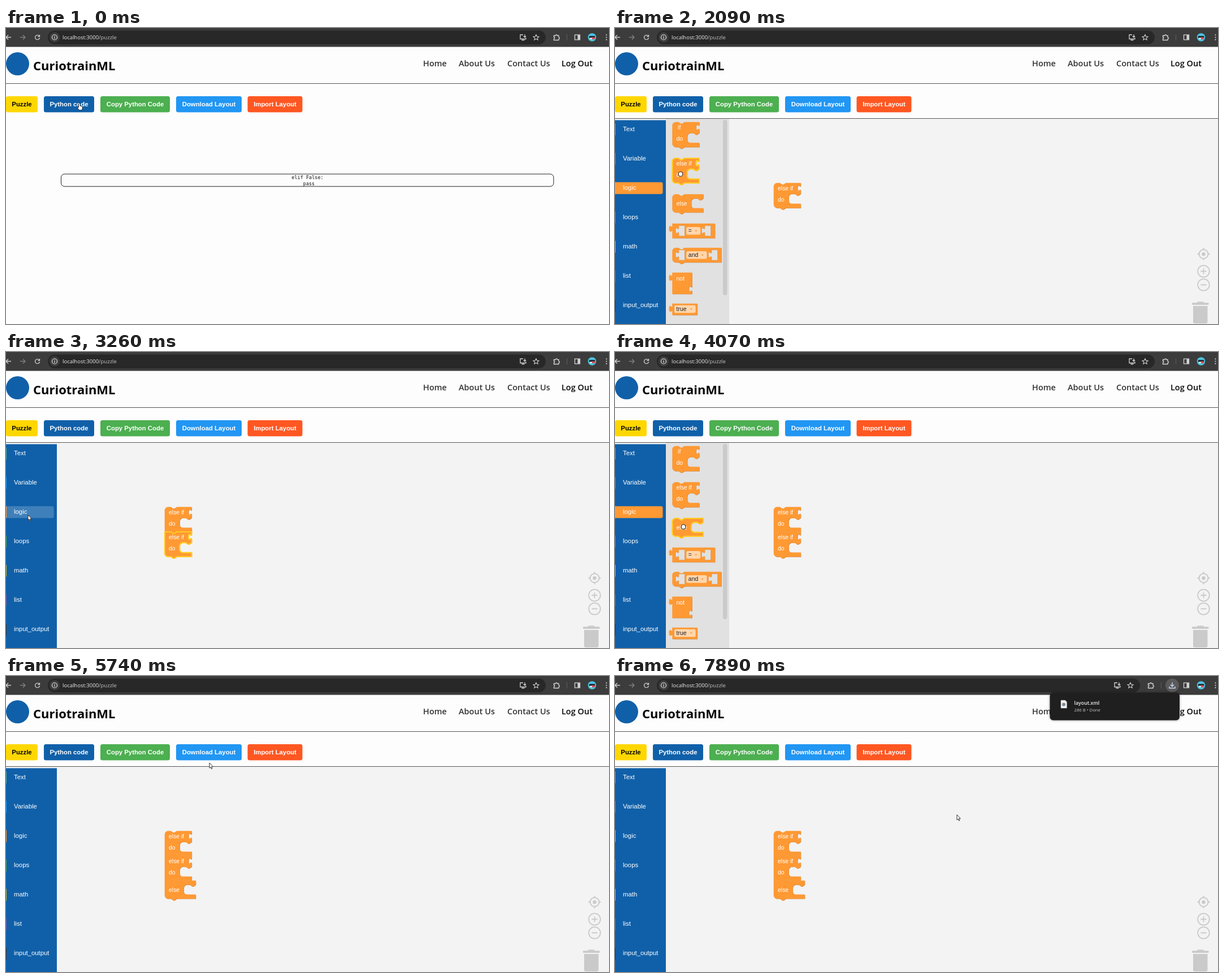
These frames come from a looping animation (1067 by 525 pixels, 8000 ms). An HTML page with a canvas:

```html
<!DOCTYPE html>
<html lang="en">
<head>
<meta charset="utf-8">
<title>Puzzle editor</title>
<style>
html, body { margin: 0; width: 100%; height: 100%; overflow: hidden; background: #fdfdfd; }
canvas { display: block; }
</style>
</head>
<body>
<canvas id="stage" width="1067" height="525"></canvas>
<script>
const g = document.getElementById('stage').getContext('2d');
const LOOP = 8000, SCALE = 0.709;
const BLUE = '#1060a9', ORANGE = '#ff9933', FLYOUT = '#e1e1e1', GREY = '#cacaca';
const ARIAL = '"Liberation Sans", Arial, sans-serif';
const UI = '"Open Sans", "Noto Sans", sans-serif';

// Cursor path: time, x, y
const TRACK = [
  [0, 130, 133], [250, 130, 133], [560, 24, 137], [800, 24, 142],
  [1270, 37, 280], [1480, 37, 280], [2060, 116, 259], [2150, 116, 259],
  [2480, 304, 352], [2620, 295.5, 347], [2800, 295.5, 347], [3240, 39, 289],
  [3480, 39, 289], [4040, 121, 310], [4200, 121, 310], [4480, 300, 378],
  [4700, 300, 378], [5060, 443, 300], [5250, 443, 300], [5740, 360, 154],
  [5880, 342, 136], [6150, 342, 136], [6290, 372, 140], [6560, 951, 260],
  [6700, 1000, 194], [6850, 990, 140], [7400, 985, 135], [7880, 605, 246], [8000, 605, 246]
];
const BUTTONS = [
  ['Puzzle', 0, 56, '#ffd700', '#000'], ['Python code', 67, 89, BLUE, '#fff'],
  ['Copy Python Code', 167, 123, '#4caf50', '#fff'],
  ['Download Layout', 301, 116, '#2196f3', '#fff'],
  ['Import Layout', 427.5, 97, '#ff5722', '#fff']
];
const ROWS = [
  ['Text', '#5ba58c'], ['Variable', '#2196f3'], ['logic', ORANGE], ['loops', '#4c9a5b'],
  ['math', '#c0b437'], ['list', '#745ba5'], ['input_output', '#333333']
];

const between = (t, a, b) => t >= a && t < b;

function cursorAt(t) {
  let i = 1;
  while (TRACK[i][0] < t) i++;
  const [t0, x0, y0] = TRACK[i - 1], [t1, x1, y1] = TRACK[i];
  const u = (t - t0) / (t1 - t0), e = u * u * (3 - 2 * u);
  return [x0 + (x1 - x0) * e, y0 + (y1 - y0) * e];
}

function text(s, x, y, font, color, align = 'left') {
  g.font = font;
  g.fillStyle = color;
  g.textAlign = align;
  g.fillText(s, x, y);
}

function rect(x, y, w, h, color, r = 0) {
  g.fillStyle = color;
  g.beginPath();
  g.roundRect(x, y, w, h, r);
  g.fill();
}

function disc(x, y, r, color) {
  g.fillStyle = color;
  g.beginPath();
  g.arc(x, y, r, 0, 7);
  g.fill();
}

function icon(x, y, d, color, width = 1.3, fill) {
  const p = new Path2D(d);
  g.save();
  g.translate(x, y);
  g.lineWidth = width;
  g.strokeStyle = color;
  if (fill) { g.fillStyle = fill; g.fill(p); }
  if (width) g.stroke(p);
  g.restore();
}

const circle = r => `M${-r},0 a${r},${r} 0 1 1 ${2 * r},0 a${r},${r} 0 1 1 ${-2 * r},0`;

/* Browser bar */
function browser(t) {
  const done = t >= 6290, shift = done ? -26 : 0;
  rect(0, 0, 1067, 33.5, '#3c3c3c');
  rect(74, 4.5, 881 + shift, 24.5, '#282828', 12.2);
  icon(4, 16.5, 'M5,0 H-4 M0,-4 L-4,0 L0,4', '#d0d0d0');
  icon(29.5, 16.5, 'M-4.5,0 H4.5 M.5,-4 L4.5,0 L.5,4', '#808080');
  icon(55.5, 16.5, 'M3.2,-2.4 A4,4 0 1 0 4,1 M4,-4.6 V-1.4 H.8', '#d0d0d0');
  disc(86, 16.5, 9, '#3e3e3e');
  icon(86, 16.5, circle(4.5) + ' M0,-.7 V2.5 M0,-2.6 V-1.4', '#e8e8e8', 1.2);
  const font = '9.5px ' + UI;
  text('localhost:3000', 100, 20, font, '#ededed');
  text('/puzzle', 100 + g.measureText('localhost:3000').width, 20, font, '#c4c4c4');
  const light = '#d4d4d4';
  icon(915 + shift, 16.5, 'M0,-4.5 H-5 V3 H5 V1 M-2.5,5 H2.5 M3,-5 V0 M.8,-2 L3,0 L5.2,-2', light);
  icon(938 + shift, 16.8, 'M0,-5 L1.5,-1.7 5,-1.4 2.3,.9 3.1,4.4 0,2.5 -3.1,4.4 -2.3,.9 -5,-1.4 -1.5,-1.7 z', light, 1.1);
  icon(974 + shift, 16.5, 'M-4.5,-3 H-1.5 a1.5,1.5 0 0 1 3,0 H4 V0 a1.5,1.5 0 0 1 0,3 V5 H-4.5 V2.3 a1.4,1.4 0 0 0 0,-2.8 z', light);
  rect(992 + shift, 11, 1, 11, '#5c5c5c');
  if (done) {
    disc(986, 16.5, 12, '#5a5a5a');
    icon(986, 16.5, 'M0,-5 V2 M-3,-1 L0,2 L3,-1 M-5,2 V5 H5 V2', '#c9dcf5', 1.4);
  }
  icon(1011, 16.5, 'M-4.5,-4.3 H4.5 V4.3 H-4.5 z', light);
  rect(1011.5, 12.5, 4, 8, light);
  disc(1037, 16.5, 7.3, '#4cc3dc');
  rect(1031.5, 14, 11, 4, '#222b38', 2);
  rect(1036, 16.5, 6, 3.5, '#e04a52', 1.5);
  rect(1033, 17.5, 4, 2.5, '#ffffff', 1);
  for (const y of [12.3, 16.5, 20.7]) disc(1062.5, y, 1.1, light);
}

/* Page header and buttons */
function header() {
  disc(20.5, 63.5, 20.5, BLUE);
  text('CuriotrainML', 48, 75, '700 22px ' + UI, '#050505');
  const nav = '600 14.5px ' + UI;
  text('Home', 738, 68.3, nav, '#333');
  text('About Us', 801, 68.3, nav, '#333');
  text('Contact Us', 887, 68.3, nav, '#333');
  text('Log Out', 983, 68.3, nav, '#0a0a0a');
  rect(0, 98, 1067, 1, '#555');
  for (const [label, x, w, fill, ink] of BUTTONS) {
    rect(x, 121, w, 28.5, fill, 3.5);
    text(label, x + w / 2, 138.6, 'bold 11.35px ' + ARIAL, ink, 'center');
  }
}

function codeView() {
  g.strokeStyle = '#222';
  g.lineWidth = 1;
  g.beginPath();
  g.roundRect(97.5, 259, 871.5, 22, 6);
  g.stroke();
  const mono = '8.5px "DejaVu Sans Mono", monospace';
  text('elif False:', 533.5, 268, mono, '#111', 'center');
  text('pass', 536, 278.7, mono, '#111', 'center');
}

/* Blocks, in editor units */
const NOTCH = 'l6,4 3,0 6,-4', NOTCH_BACK = 'l-6,4 -3,0 -6,-4';
const TAB_DOWN = 'c0,10 -8,-8 -8,7.5 s8,-2.5 8,7.5';
const TAB_UP = 'c0,-10 -8,8 -8,-7.5 s8,2.5 8,-7.5';
const topLeft = sq => sq ? 'M0,0' : 'M0,8 a8,8 0 0 1 8,-8';
const bottomLeft = sq => sq ? 'H0 z' : 'H8 a8,8 0 0 1 -8,-8 z';

function clause(w, inner, row, tab, top, bottom) {
  return `${topLeft(top)} H15 ${NOTCH} H${w} ${tab ? 'v5 ' + TAB_DOWN : ''} V${row}
    H${inner + 30} ${NOTCH_BACK} h-7 a8,8 0 0 0 -8,8 v9 a8,8 0 0 0 8,8 H${w} V${row + 35}
    H30 ${NOTCH_BACK} ${bottomLeft(bottom)}`;
}
const output = (w, h, right = '') => `M0,0 H${w} ${right} V${h} H0 V20 ${TAB_UP} z`;

function block(x, y, d, selected, inside) {
  const p = new Path2D(d);
  g.save();
  g.translate(x, y);
  g.scale(SCALE, SCALE);
  g.save();
  g.translate(1, 1);
  g.fillStyle = '#cc7a29';
  g.fill(p);
  g.restore();
  g.fillStyle = ORANGE;
  g.fill(p);
  g.lineJoin = 'round';
  g.lineWidth = selected ? 3 : 0.8;
  g.strokeStyle = selected ? '#ffcc22' : '#f5a04a';
  g.stroke(p);
  inside();
  g.restore();
}

const label = (s, x, y, ink = '#fff') => text(s, x, y, '14.67px ' + ARIAL, ink);

function hole(x, w) {
  icon(0, 0, `M${x},5 h${w} v26 h${-w} V25 ${TAB_UP} z`, '#d98a38', 0.8, FLYOUT);
}

function dropdown(s, x, y, w) {
  rect(x, y, w, 19, '#ffd6ad', 4);
  label(s, x + 5, y + 14.5, '#222');
  icon(x + w - 11, y + 8, 'M-3,0 H3 L0,4 z', ORANGE, 0, ORANGE);
}

function elseIf(x, y, selected, top, bottom, word = 'else if') {
  block(x, y, clause(67, 37, 27, true, top, bottom), selected, () => {
    label(word, word === 'if' ? 13.5 : 10, 18.5);
    label('do', 10, 46);
  });
}

function elseBlock(x, y, selected, top) {
  block(x, y, clause(77, 47, 10, false, top), selected, () => label('else', 10, 28.5));
}

function flyout(t) {
  rect(90, 161, 112, 364, FLYOUT);
  rect(191, 163, 7.5, 311, '#cbcbcb', 3.7);
  const x = 101.5;
  elseIf(x, 167, false, false, false, 'if');
  elseIf(x, 231, between(t, 2030, 2150));
  elseBlock(x, 295, between(t, 4010, 4200));
  block(x, 347, output(106, 36), false, () => {
    hole(16, 15);
    dropdown('=', 35, 8.5, 35);
    hole(81, 15);
  });
  const both = `${topLeft()} H15 ${NOTCH} H122 V36 H30 ${NOTCH_BACK} ${bottomLeft()}`;
  block(x, 390, both, false, () => {
    hole(16, 15);
    dropdown('and', 35, 8.5, 51);
    hole(98, 15);
  });
  block(x, 434, output(49, 53, 'V33 ' + TAB_DOWN), false, () => label('not', 10, 19.5));
  block(x, 489, output(62, 28), false, () => dropdown('true', 5, 4, 53));
}

function controls() {
  icon(1041.5, 401, circle(8) + ' M0,-11 V-7 M0,7 V11 M-11,0 H-7 M7,0 H11', GREY, 2);
  disc(1041.5, 401, 3.2, GREY);
  icon(1041.5, 431.5, circle(10.3) + ' M-5,0 H5 M0,-5 V5', GREY, 1.8);
  icon(1041.5, 455.5, circle(10.3) + ' M-5,0 H5', GREY, 1.8);
  rect(1021, 487.3, 29.5, 3.7, GREY, 1);
  rect(1030, 485.5, 11.5, 3, GREY, 1);
  rect(1023, 493, 25.5, 31, GREY, [0, 0, 3, 3]);
}

function puzzleView(t, cx, cy) {
  rect(0, 160, 1067, 365, '#f3f3f3');
  rect(0, 160, 1067, 1, '#555');
  controls();

  const open = between(t, 1520, 2150) || between(t, 3410, 4200);
  rect(0, 163.5, 90, 361.5, BLUE);
  ROWS.forEach(([name, color], i) => {
    const y = 169.4 + i * 52.05;
    const hover = cx < 84.5 && cy >= y && cy < y + 21;
    if (open && i === 2) rect(0, y, 84.5, 21, ORANGE, [0, 3, 3, 0]);
    else if (hover) rect(0, y, 84.5, 21, '#4080ba', [0, 3, 3, 0]);
    rect(0, y, 1, 21, color);
    text(name, 14, y + 13.2, '11.35px ' + ARIAL, '#fff');
  });

  const second = t >= 2620, third = t >= 4480;
  elseIf(281, 275, false, false, second);
  if (second) elseIf(281, 319, t < 3410, true, third);
  if (third) elseBlock(281, 363, t < 5150, true);
  if (open) flyout(t);
  if (between(t, 2150, 2620)) elseIf(cx - 14.5, cy - 28, true);
  if (between(t, 4200, 4480)) elseBlock(cx - 19, cy - 15, true);
}

function bubble(t) {
  if (t < 6290) return;
  g.save();
  g.globalAlpha = Math.min(1, (t - 6290) / 200);
  g.shadowColor = 'rgba(0,0,0,.4)';
  g.shadowBlur = 4;
  rect(769.5, 29.5, 229.5, 49, '#1f1f1f', 6);
  g.shadowColor = 'transparent';
  icon(794, 50, 'M-5,-7 H2.5 L5.5,-4 V7 H-5 z', '#bbb', 0.5, '#f2f2f2');
  disc(794, 50.5, 3, '#7d8a92');
  text('layout.xml', 812.5, 51.3, '600 8.8px ' + UI, '#f0f0f0');
  text('286 B • Done', 812.5, 63, '7.7px ' + UI, '#c8c8c8');
  g.restore();
}

function cursor(t, x, y) {
  const onButton = y >= 121 && y < 149.5 && BUTTONS.some(b => x >= b[1] && x < b[1] + b[2]);
  if (between(t, 2000, 2860) || between(t, 3980, 4760)) {
    icon(x, y, 'M-3.5,-1.5 Q-3,-4 -1.5,-3.5 Q0,-4.8 1.3,-3.6 Q3.8,-3.8 3.8,-1 Q4,2 2.3,4 H-2 Q-5,1 -3.5,-1.5 z', '#111', 1, '#fff');
  } else if (onButton) {
    icon(x, y, 'M-1.5,1 q1.3,-2 2.6,0 V5 l3,.7 q1.5,.5 1.3,2.5 l-.8,4.5 h-5 l-3.5,-4.5 q.5,-1.5 2.4,-.3 z', '#111', 0.9, '#fff');
  } else {
    icon(x, y, 'M0,0 V9.3 L2,7.4 L3.5,10.8 L5,10.1 L3.6,6.9 H6.4 z', '#222', 0.9, '#fff');
  }
}

function frame(now) {
  const t = now % LOOP, [x, y] = cursorAt(t);
  rect(0, 0, 1067, 525, '#fdfdfd');
  browser(t);
  header();
  if (t < 640) codeView();
  else puzzleView(t, x, y);
  bubble(t);
  cursor(t, x, y);
  requestAnimationFrame(frame);
}
requestAnimationFrame(frame);
</script>
</body>
</html>
```
